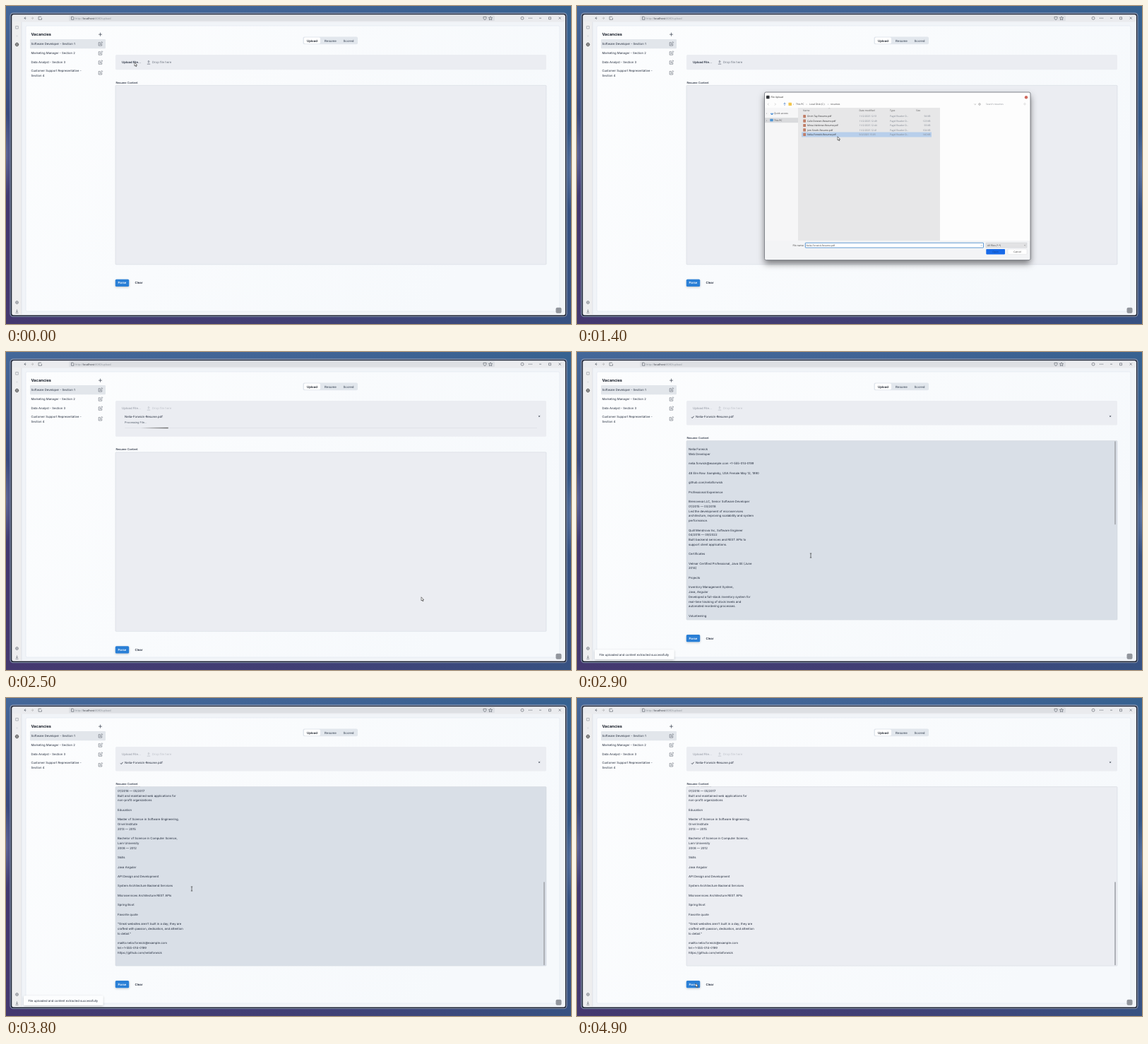
Recreate the animation shown at these times as an HTML page. Size 800 by 450 pixels, loop 5 s.

```html
<!DOCTYPE html>
<html lang="en">
<head>
<meta charset="utf-8">
<title>Resume upload</title>
<style>
html, body { margin: 0; width: 100%; height: 100%; overflow: hidden; background: #36406d; }
svg { display: block; width: 100vw; height: 100vh; }
text { font-family: Inter, sans-serif; text-rendering: geometricPrecision; white-space: pre; }
.os text { font-family: "Open Sans", "Noto Sans", sans-serif; }
</style>
</head>
<body>
<svg id="stage" viewBox="0 0 800 450" preserveAspectRatio="none"></svg>
<script>
const INK = '#20293a', GREY = '#7b828d';

// Markup helpers; text is placed by its vertical centre.
const text = (x, y, s, size = 4.26, fill = INK, more = '') =>
  `<text x="${x}" y="${y + size * .36}" font-size="${size}" fill="${fill}" ${more}>${s}</text>`;
const rect = (x, y, w, h, fill, r = 0, more = '') =>
  `<rect x="${x}" y="${y}" width="${w}" height="${h}" rx="${r}" fill="${fill}" ${more}/>`;
const line = (d, stroke = '#555b65', w = .6, more = '') =>
  `<path d="${d}" fill="none" stroke="${stroke}" stroke-width="${w}" ${more}/>`;
const ring = (x, y, r, stroke = '#555b65') =>
  `<circle cx="${x}" cy="${y}" r="${r}" fill="none" stroke="${stroke}" stroke-width=".6"/>`;
const group = (id, body, more = '') => `<g id="${id}" ${more}>${body}</g>`;
const BOLD = 'font-weight="600" ', MID = 'text-anchor="middle"', END = 'text-anchor="end"';

const defs = `<defs>
  <linearGradient id="sky" x2="0" y2="1"><stop stop-color="#44689a"/><stop offset=".35" stop-color="#39497d"/>
    <stop offset=".65" stop-color="#43366e"/><stop offset="1" stop-color="#44386f"/></linearGradient>
  <linearGradient id="night"><stop stop-color="#2f5f8c" stop-opacity="0"/><stop offset=".5" stop-color="#35588a" stop-opacity=".2"/>
    <stop offset="1" stop-color="#2f5f8c" stop-opacity=".65"/></linearGradient>
  <radialGradient id="glow"><stop stop-color="#a9b6dc" stop-opacity=".35"/><stop offset="1" stop-color="#a9b6dc" stop-opacity="0"/></radialGradient>
  <linearGradient id="page" x2="1" y2=".4"><stop stop-color="#fcfdfe"/><stop offset="1" stop-color="#f6f9fc"/></linearGradient>
  <linearGradient id="run"><stop stop-color="#555" stop-opacity="0"/><stop offset="1" stop-color="#666"/></linearGradient>
  <filter id="soft" x="-20%" y="-20%" width="140%" height="150%"><feDropShadow dx="0" dy="5" stdDeviation="5" flood-opacity=".5"/></filter>
  <filter id="lift" x="-20%" y="-50%" width="140%" height="250%"><feDropShadow dx="0" dy="1" stdDeviation="1.5" flood-opacity=".22"/></filter>
  <clipPath id="field">${rect(155, 112.5, 606, 253, '#000')}</clipPath>
  <clipPath id="track">${rect(168, 106, 584, 3, '#000')}</clipPath>
</defs>`;

const backdrop = rect(0, 0, 800, 450, 'url(#sky)') + rect(0, 0, 800, 450, 'url(#night)') +
  '<ellipse cx="0" cy="210" rx="8" ry="60" fill="url(#glow)"/><ellipse cx="800" cy="230" rx="8" ry="60" fill="url(#glow)"/>';

// A pale glass rim, a dark line, then the window with its white edge.
const browser = rect(5.5, 9.5, 789, 430.5, '#8592ac', 4.5) +
  rect(6.8, 11, 786.4, 428, '#1c2233', 3.5) +
  rect(8.3, 12.3, 783.6, 425.2, '#f1f4f8', 2.5) + rect(9, 12.8, 782, 9.7, '#eaebee', 2) +
  rect(9, 22, 13, 414.5, '#eeeeef') + line('M22 22.5V436.5', '#d5d9e0', .6) +
  rect(89, 13.2, 603, 8, '#dddfe3', 1.5) +
  rect(28, 28, 756, 404, 'url(#page)', 2, 'stroke="#dfe5ee" stroke-width=".6"') +
  line('M28 15.5l-2 1.7 2 1.7M25.5 17.2h3') + line('M35.5 17.2h3M37 15.5l2 1.7-2 1.7', '#aaa') +
  line('M50 15.2h-4v4h4.5v-2.5') + line('M92.5 15.2h2.5l1 1v3h-3.5z') +
  line('M676 15.3h4v2q-.5 1.8-2 2.3q-1.5-.5-2-2.3z') +
  line('M686 14.8l.8 1.6 1.8.2-1.3 1.2.4 1.9-1.7-.9-1.7.9.4-1.9-1.3-1.2 1.8-.2z') +
  ring(731, 17.2, 2) + line('M740 17.2h5', '#555b65', .9, 'stroke-dasharray="1 1"') +
  line('M755 17.2h3M768.5 15.8h3v3h-3zM782.7 15.7l3 3m0-3l-3 3') +
  line('M13.7 28.5h3.6v3.6h-3.6z', '#8b9098') + line('M14.5 41.5l2 2m0-2l-2 2', '#c4c6ca') +
  ring(15.5, 54.5, 2.3, '#222') + line('M13.2 54.5h4.6M15.5 52.2q-2 2.3 0 4.6q2-2.3 0-4.6', '#222', .5) +
  ring(15.5, 419.5, 2) + ring(15.5, 419.5, .7) + line('M15.5 429.5v3.5m-1.4-1.4l1.4 1.4 1.4-1.4M13.5 434.3h4') +
  rect(778.5, 426.8, 8, 8, '#92969d', 2) +
  `<g class="os">${text(98, 17.3, 'http://<tspan fill="#30343c">localhost</tspan>:8080/upload', 3.8, '#8b9098')}</g>`;

const edit = y => line(`M133.5 ${y - 2}h-2.3v4.5h4.5v-2.3M133 ${y + .8}l.2-1.2 2.6-2.6 1 1-2.6 2.6z`, '#414957', .5);
const jobs = text(35.5, 40.2, 'Vacancies', 5.6, '#141a25', 'font-weight="700"') +
  line('M131 40.2h5M133.5 37.7v5', INK, .6) +
  rect(34, 47, 107, 13.2, '#e2e6eb', 1.2) +
  text(35.5, 53.6, 'Software Developer - Section 1') + text(35.5, 66.7, 'Marketing Manager - Section 2') +
  text(35.5, 79.8, 'Data Analyst - Section 3') + text(35.5, 91.2, 'Customer Support Representative -') +
  text(35.5, 98, 'Section 4') + [53.6, 66.7, 79.8, 94.5].map(edit).join('');

const tabs = rect(420.5, 43.5, 77.5, 10.7, '#e2e7ed', 2) +
  rect(422, 44.6, 23, 8.6, '#fff', 1.6) + text(433.5, 49, 'Upload', 4.35, '#141a25', BOLD + MID) +
  text(459.5, 49, 'Resume', 4.35, '#56606f', BOLD + MID) +
  text(485, 49, 'Scored', 4.35, '#56606f', BOLD + MID);

const FILE = 'Nelia-Forwick-Resume.pdf';
const upload = '<rect id="drop" x="155" y="69" width="610" height="21.3" rx="1.5" fill="#ebedf2"/>' +
  group('pick', text(164, 79.9, 'Upload File...', 4.26, INK, BOLD) +
    line('M202 81v-3.5m-1.4 1.4l1.4-1.4 1.4 1.4M199.8 82.2h4.4', '#4c5462') +
    text(207, 79.9, 'Drop file here', 4.26, '#69717d')) +
  group('entry', text(168, 91.2, FILE) + line('M754 89.8l2.2 2.2m0-2.2l-2.2 2.2', '#303846')) +
  group('busy', text(168, 99.3, 'Processing File...', 3.9, '#525c6b') + rect(168, 107, 584, .7, '#dde0e6') +
    `<g clip-path="url(#track)"><rect id="bar" y="106.8" width="39" height="1.4" fill="url(#run)"/></g>`) +
  group('tick', line('M162 92.3l1.2 1.2 2.3-2.7', INK, .8));

const resume = `
Nelia Forwick
Web Developer

nelia.forwick@example.com +1-555-014-0199

48 Elm Row. Sampleby, USA Female May 12, 1990

github.com/neliaforwick

Professional Experience

Brenovexa LLC, Senior Software Developer
01/2015 — 03/2018
Led the development of microservices
architecture, improving scalability and system
performance.

Quill Mendrova Inc, Software Engineer
04/2018 — 09/2022
Built backend services and REST APIs to
support client applications.

Certificates

Velmar Certified Professional, Java SE (June
2014)

Projects

Inventory Management System,
Java, Angular
Developed a full-stack inventory system for
real-time tracking of stock levels and
automated reordering processes.

Volunteering

Web Mentor,
09/2017 — 12/2018
Guided students in coding

Web for Causes
01/2016 — 05/2017
Built and maintained web applications for
non-profit organizations

Education

Master of Science in Software Engineering,
Orvel Institute
2013 — 2015

Bachelor of Science in Computer Science,
Larn University
2008 — 2012

Skills

Java Angular

API Design and Development

System Architecture Backend Services

Microservices Architecture REST APIs

Spring Boot

Favorite quote

"Great websites aren't built in a day; they are
crafted with passion, dedication, and attention
to detail."

mailto:nelia.forwick@example.com
tel:+1-555-014-0199
https://github.com/neliaforwick`.trim().split('\n');

const lower = group('lower', text(155.5, 108.2, 'Resume Content', 3.95, INK, 'font-weight="500"') +
  '<rect id="area" x="155" y="112.3" width="610" height="253.5" rx="1" stroke="#d3d8e0" stroke-width=".6"/>' +
  group('filled', `<g clip-path="url(#field)">${group('roll', resume.map((s, i) => text(158, 124.4 + i * 6.73, s)).join(''))}</g>` +
    '<rect id="thumb" x="761" width="2" height="118" rx=".8" fill="#aeb1b7"/>') +
  rect(154.8, 386.7, 19.4, 10.3, '#2a7fd6', 1.6, 'filter="url(#lift)"') + text(164.5, 391.9, 'Parse', 4.3, '#fff', BOLD + MID) +
  text(188, 391.9, 'Clear', 4.3, INK, BOLD + MID));

const toast = group('toast', rect(25, 421.3, 112.5, 13.4, '#fcfdfe', 1.5, 'filter="url(#lift)"') +
  text(31.5, 428.2, 'File uploaded and content extracted successfully'));

const files = [
  ['Orvin Tay-Resume.pdf', '11/2/2025 12:51', '94 KB'], ['Calix Dorwen-Resume.pdf', '11/2/2025 12:49', '123 KB'],
  ['Mirea Valdonez-Resume.pdf', '11/2/2025 12:44', '93 KB'], ['Jem Stroth-Resume.pdf', '11/2/2025 12:41', '104 KB'],
  [FILE, '9/2/2025 15:05', '140 KB']];
const os = (x, y, s, fill = '#3a3a3c', more = '') => text(x, y, s, 3.35, fill, more);
const fileRow = ([name, date, size], i) => {
  const y = 156.1 + i * 6.45;
  return rect(320.2, y - 2.1, 3.8, 4.2, '#c07f68', .4) + os(326, y, name, '#28282a') + os(399.5, y, date, GREY) +
    os(443, y, 'Pagel Reader D...', GREY) + os(500.5, y, size, GREY, END);
};
const dialog = group('dialog', rect(265.5, 122, 376.5, 237.5, '#fdfdfd', 2, 'filter="url(#soft)"') +
  rect(265.5, 332, 376.5, 27.5, '#f3f4f6', 2) + rect(265.5, 144, 48, 188, '#f6f6f7') +
  rect(313, 144, 201, 188, '#e7e7e8') + rect(265.5, 122, 376.5, 237.5, 'none', 2, 'stroke="#575b63" stroke-width=".7"') +
  rect(268, 126.7, 4.6, 4.6, '#33353a', .8) + os(274.5, 129.1, 'File Upload', '#222') +
  '<circle cx="636" cy="129.2" r="2.2" fill="#cf6a5e"/>' +
  line('M271.5 137.5l-1.5 1.5 1.5 1.5M280 137.5l1.5 1.5-1.5 1.5', '#bbb') +
  line('M294 141v-4m-1.5 1.5l1.5-1.5 1.5 1.5', '#3f78c5') + rect(299.5, 136.8, 4.5, 4.2, '#f3c64e', .5) +
  os(306, 139, '›') + os(310, 139, 'This PC') + os(324.5, 139, '›') + os(329, 139, 'Local Disk (C:)') +
  os(355, 139, '›') + os(359, 139, 'resumes') + line('M562.5 138.5l1.2 1.2 1.2-1.2', '#777', .5) + ring(570, 139, 1.3, '#888') +
  os(579, 139, 'Search resumes', '#8d9095') + ring(634, 138.7, 1.2, '#ccc') +
  os(320, 147.3, 'Name', '#555') + os(399.5, 147.3, 'Date modified', '#555') + os(443, 147.3, 'Type', '#555') +
  os(480, 147.3, 'Size', '#555') + line('M356 145.4l1.2-1 1.2 1', '#999', .4) +
  rect(266, 158.2, 47, 7, '#d9dadd') + os(268, 152, '›') + os(268, 161.6, '›') +
  line('M274 152.2h4l-2 1.7z', '#4b8ed6', 1) + rect(273.3, 159.8, 4.4, 3.4, '#4c94d4', .4) +
  os(279, 152.1, 'Quick access') + os(279, 161.7, 'This PC') +
  group('marked', rect(318, 178.5, 184, 7, '#b8cfeb')) + files.map(fileRow).join('') +
  group('hint', os(578, 238, 'Select a file to preview.', '#555', MID)) +
  os(321.5, 338.4, 'File name:', '#333', END) + rect(323.3, 335.2, 252.2, 6.8, '#fff', .5, 'stroke="#3c82c8" stroke-width=".8"') +
  group('chosen', os(324.5, 338.5, FILE)) + line('M571.5 338l1.2 1.2 1.2-1.2', '#777', .4) +
  rect(579, 335, 58, 7, '#e2e2e4', .5, 'stroke="#c3c5c9" stroke-width=".4"') + os(581, 338.5, 'All Files (*.*)') +
  line('M633 338l1.2 1.2 1.2-1.2', '#555', .4) +
  rect(579.3, 344, 26.7, 7.4, '#1769e8', .8) + os(592.6, 347.7, 'Open', '#0c3f94', MID) +
  rect(610, 344, 27, 7.4, '#fff', .8, 'stroke="#d5d7da" stroke-width=".4"') + os(623.5, 347.7, 'Cancel', '#333', MID), 'class="os"');

const pointer = group('arrow', '<path d="M0-2.2v5.2l1.2-1 .8 1.8.9-.4-.8-1.7h1.6z" fill="#fff" stroke="#222" stroke-width=".55"/>') +
  group('beam', line('M-1.2-3h2.4M0-3v6M-1.2 3h2.4', '#222', .6));

const stage = document.getElementById('stage');
stage.innerHTML = defs + backdrop + browser + jobs + tabs + upload + lower + toast + dialog + pointer;

const $ = id => document.getElementById(id);
const show = (id, on) => $(id).setAttribute('visibility', on ? 'visible' : 'hidden');
const set = (id, name, value) => $(id).setAttribute(name, value);
const ease = p => { p = Math.max(0, Math.min(1, p)); return p * p * (3 - 2 * p); };

const OPEN = 250, SELECT = 1150, SEND = 2200, DONE = 2700, GONE = 4500;
const path = [[0, 182, 82], [250, 182, 82], [500, 298, 161], [1100, 369, 187], [1500, 369, 187], [2050, 588, 349],
  [2520, 588, 349], [2900, 331, 288], [3700, 263, 270], [4200, 263, 270], [4700, 168, 406], [5000, 168, 406]];

function cursorAt(t) {
  const i = path.findIndex(p => p[0] > t), [t0, x0, y0] = path[i - 1], [t1, x1, y1] = path[i];
  const p = ease((t - t0) / (t1 - t0));
  return [x0 + (x1 - x0) * p, y0 + (y1 - y0) * p];
}

function draw(t) {
  const picking = t >= OPEN && t < SEND, chosen = t >= SELECT;
  const sent = t >= SEND, done = t >= DONE, busy = sent && !done;
  const shift = done ? 13.3 : sent ? 29.5 : 0;
  const [x, y] = cursorAt(t);
  const over = done && x > 155 && y > 125 && y < 379;
  const scroll = ease((t - 2950) / 750);

  show('dialog', picking);
  for (const id of ['marked', 'chosen']) show(id, picking && chosen);
  show('hint', picking && !chosen);
  show('entry', sent);
  show('busy', busy);
  show('tick', done);
  show('filled', done);
  show('toast', done && t < GONE);
  show('arrow', !over);
  show('beam', over);

  set('pick', 'opacity', sent ? .35 : 1);
  set('drop', 'height', 21.3 + shift);
  set('bar', 'x', 168 + ((t - 2430) * .32 + 584) % 584);
  set('lower', 'transform', `translate(0 ${shift})`);
  set('area', 'fill', over ? '#d9dfe7' : '#ebedf2');
  set('roll', 'transform', `translate(0 ${-289 * scroll})`);
  set('thumb', 'y', 113 + 134 * scroll);
  for (const id of ['arrow', 'beam']) set(id, 'transform', `translate(${x} ${y})`);
}

const start = performance.now();
(function tick() {
  draw((performance.now() - start) % 5000);
  requestAnimationFrame(tick);
})();
</script>
</body>
</html>
```
